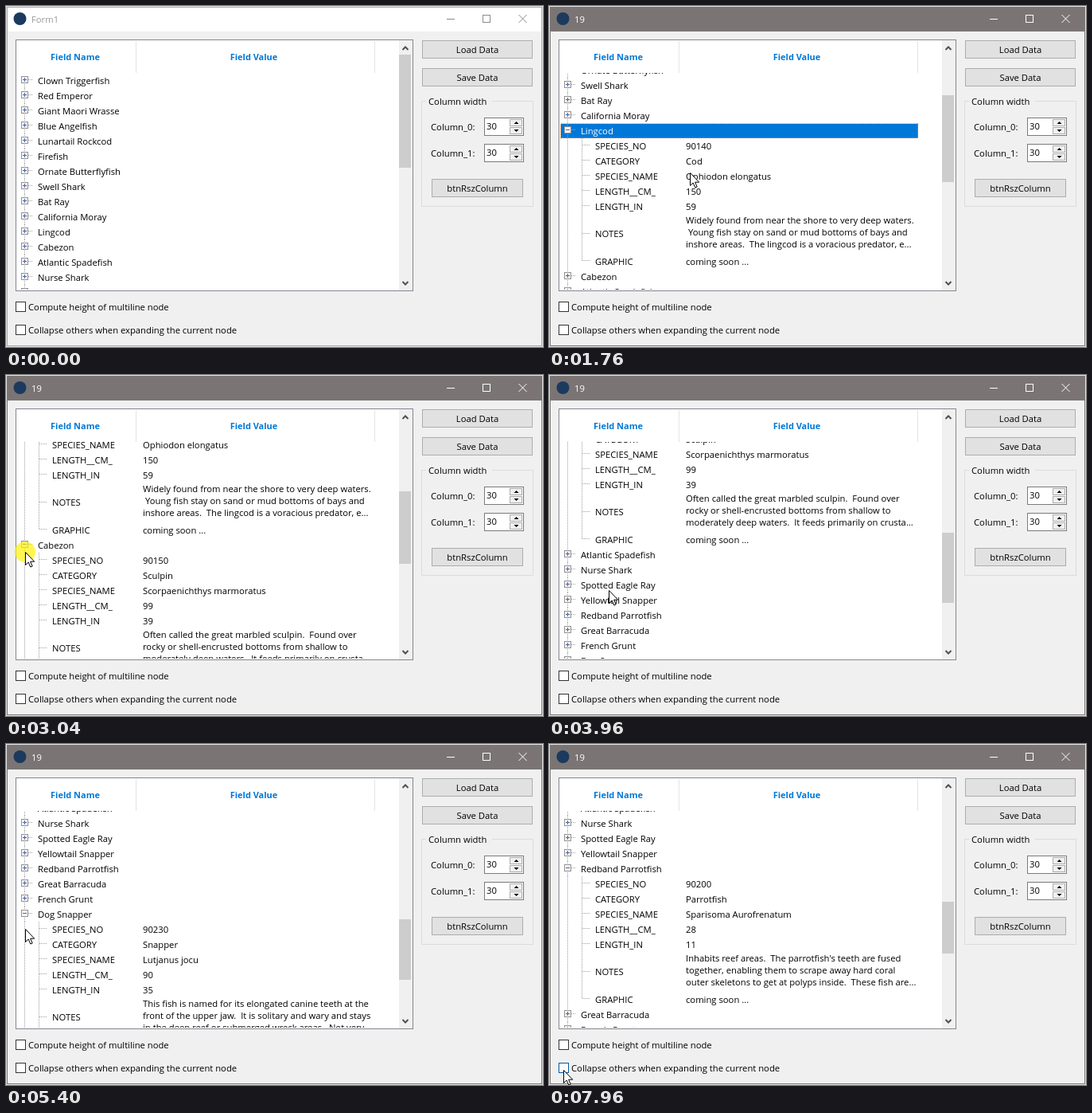
Write an HTML page that moves like this. It is 675 px wide and 428 px high and loops after 8 s.

```html
<!DOCTYPE html>
<html lang="en">
<head>
<meta charset="utf-8">
<title>Tree view</title>
<style>
  html, body { margin: 0; width: 100%; height: 100%; overflow: hidden; background: #e6e6e6; }
  svg { display: block; width: 675px; height: 428px; shape-rendering: crispEdges; }
  text { font: 11.25px "Open Sans", "Noto Sans", sans-serif; fill: #000; white-space: pre; }
  .head { font-weight: 700; font-size: 11px; fill: #0078d7; }
  .mid { text-anchor: middle; }
  .btn { fill: #e1e1e1; stroke: #adadad; }
  .check { fill: #fff; stroke: #333; }
  .check.hover { stroke: #005a9e; }
  .dots { stroke: #a0a0a0; stroke-dasharray: 1 1; fill: none; }
  .box { fill: #fafafa; stroke: #919191; }
  .sign { stroke: #4b63a7; fill: none; }
  .smooth { shape-rendering: geometricPrecision; }
  #frame { fill: #f0f0f0; stroke: #a6a6a6; }
  #bar { fill: #fff; }
  #caption { fill: #999; }
  #controls { stroke: #8c8c8c; fill: none; }
  .active #frame { stroke: #7a7574; }
  .active #bar { fill: #7a7574; }
  .active #caption { fill: #fff; }
  .active #controls { stroke: #fff; }
  .selection { display: none; fill: #0078d7; stroke: #e08a3c; stroke-dasharray: 1 1; }
  .selected .selection { display: inline; }
  .selected > .name { fill: #fff; }
  .details, .upright { display: none; }
  .open .details { display: inline; }
  .closed .upright { display: inline; }
</style>
</head>
<body>
<svg id="stage" viewBox="0 0 675 428">
  <defs>
    <clipPath id="view"><rect x="13" y="84" width="481" height="272"/></clipPath>
    <g id="spin">
      <rect x="1.5" y=".5" width="49" height="22" fill="#fff" stroke="#7a7a7a"/>
      <rect x="33.5" y="2.5" width="15" height="8" fill="#f0f0f0" stroke="#adadad"/>
      <rect x="33.5" y="12.5" width="15" height="8" fill="#f0f0f0" stroke="#adadad"/>
      <path class="smooth" d="M38.500 8h6l-3-3zM38.500 15h6l-3 3z"/>
      <text x="4" y="15">30</text>
    </g>
  </defs>

  <rect id="frame" x="1.5" y="1.5" width="672" height="425"/>
  <rect id="bar" x="2" y="2" width="671" height="30"/>
  <circle class="smooth" cx="17.500" cy="16" r="8" fill="#1c3a5e"/>
  <text id="caption" x="32" y="21"></text>
  <g id="controls">
    <path d="M554 16.5h10M599.500 11.500h9v9h-9z"/>
    <path class="smooth" d="M644.500 11l10 10M654.500 11l-10 10"/>
  </g>

  <rect x="12.5" y="42.500" width="499" height="315" fill="#fff" stroke="#828790"/>
  <path d="M163.500 44V84M463.500 44V84" stroke="#e5e5e5"/>
  <text class="head mid" x="87" y="68">Field Name</text>
  <text class="head mid" x="311.500" y="68">Field Value</text>
  <g id="tree" clip-path="url(#view)"></g>
  <rect x="494" y="43" width="17" height="314" fill="#f0f0f0"/>
  <path class="smooth" d="M498.500 55l3.500-3.500 3.500 3.500M498.500 346l3.500 3.500 3.500-3.500" fill="none" stroke="#505050" stroke-width="2"/>
  <rect id="thumb" x="494" width="15" fill="#cdcdcd"/>

  <rect class="btn" x="523.500" y="43.500" width="138" height="22"/>
  <text class="mid" x="592.500" y="59">Load Data</text>
  <rect class="btn" x="523.500" y="78.500" width="138" height="22"/>
  <text class="mid" x="592.500" y="94">Save Data</text>
  <path d="M528 119.500h-5.500v132h140v-132h-52" fill="none" stroke="#dcdcdc"/>
  <text x="531" y="124">Column width</text>
  <text x="534" y="156">Column_0:</text>
  <text x="534" y="189">Column_1:</text>
  <use href="#spin" x="600" y="140"/>
  <use href="#spin" x="600" y="173"/>
  <rect class="btn" x="535.500" y="217.500" width="114" height="22"/>
  <text class="mid" x="592.500" y="233">btnRszColumn</text>

  <rect id="check1" class="check" x="12.500" y="371.500" width="12" height="12"/>
  <text x="28" y="382">Compute height of multiline node</text>
  <rect id="check2" class="check" x="12.500" y="400.500" width="12" height="12"/>
  <text x="28" y="411">Collapse others when expanding the current node</text>

  <g id="cursor" class="smooth">
    <circle id="click" r="13" fill="#fff200" opacity=".68"/>
    <path d="M.5 .5V16.500L4.200 13 6.800 19 9.200 18 6.600 12.200H11.700Z" fill="#fff" stroke="#000"/>
  </g>
</svg>
<script>
const LOOP = 8000, TICK = 40, ROW = 19, NOTES = 50, DETAILS = ROW * 6 + NOTES;
const VIEW_TOP = 84, VIEW_HEIGHT = 273, TRACK_TOP = 61, TRACK = 278;

const names = `Clown Triggerfish,Red Emperor,Giant Maori Wrasse,Blue Angelfish,Lunartail Rockcod,Firefish,
Ornate Butterflyfish,Swell Shark,Bat Ray,California Moray,Lingcod,Cabezon,Atlantic Spadefish,Nurse Shark,
Spotted Eagle Ray,Yellowtail Snapper,Redband Parrotfish,Great Barracuda,French Grunt,Dog Snapper,
Nassau Grouper,Bluehead Wrasse,Yellow Jack,Redtail Surfperch,White Sea Bass,Rock Greenling,Senorita,Surf Smelt`
  .split(/,\s*/);
const fields = ['SPECIES_NO', 'CATEGORY', 'SPECIES_NAME', 'LENGTH__CM_', 'LENGTH_IN', 'NOTES', 'GRAPHIC'];

const records = {
  Lingcod: { opens: 400, values: ['90140', 'Cod', 'Ophiodon elongatus', '150', '59',
    ['Widely found from near the shore to very deep waters.',
     ' Young fish stay on sand or mud bottoms of bays and',
     'inshore areas.  The lingcod is a voracious predator, e...']] },
  Cabezon: { opens: 3040, values: ['90150', 'Sculpin', 'Scorpaenichthys marmoratus', '99', '39',
    ['Often called the great marbled sculpin.  Found over',
     'rocky or shell-encrusted bottoms from shallow to',
     'moderately deep waters.  It feeds primarily on crusta...']] },
  'Dog Snapper': { opens: 5040, values: ['90230', 'Snapper', 'Lutjanus jocu', '90', '35',
    ['This fish is named for its elongated canine teeth at the',
     'front of the upper jaw.  It is solitary and wary and stays',
     'in the deep reef or submerged wreck areas.  Not very ...']] },
  'Redband Parrotfish': { opens: 6600, values: ['90200', 'Parrotfish', 'Sparisoma Aurofrenatum', '28', '11',
    ["Inhabits reef areas.  The parrotfish's teeth are fused",
     'together, enabling them to scrape away hard coral',
     'outer skeletons to get at polyps inside.  These fish are...']] },
};

// time, scroll offset, content height known to the scroll bar
const scrolls = [
  [0, 0, 532], [400, 70, 665], [1760, 127, 696], [1800, 241, 696], [3040, 253, 829],
  [3600, 310, 860], [3680, 367, 860], [3760, 424, 860], [4080, 481, 860], [4160, 538, 860],
  [5040, 569, 993], [6600, 569, 1157],
];

// start, end, target x and y, optional control point of the curve
const moves = [
  [400, 1040, 225, 272], [1320, 1600, 177, 209], [2160, 2880, 24, 222, 90, 262],
  [3120, 3800, 78, 268], [3880, 3960, 75, 270], [4160, 4680, 31, 236], [4800, 4880, 26, 240],
  [5000, 5040, 23, 241], [5200, 5800, 26, 205], [5880, 6240, 26, 160], [6400, 6440, 27, 155],
  [6960, 7720, 18, 392, 140, 290], [7800, 7960, 18, 409],
];
const clicks = [3040, 5040, 6600];

const $ = id => document.getElementById(id);

function add(parent, tag, attrs, text) {
  const node = document.createElementNS('http://www.w3.org/2000/svg', tag);
  for (const key in attrs) node.setAttribute(key, attrs[key]);
  if (text) node.textContent = text;
  return parent.appendChild(node);
}

const label = (parent, x, y, text, cls = '') => add(parent, 'text', { x, y, class: cls }, text);

function addDetails(node, values) {
  const group = add(node, 'g', { class: 'details' });
  add(group, 'path', { class: 'dots', d: `M23.5 ${ROW}V${ROW + DETAILS}M41.5 ${ROW}V${ROW + DETAILS - 10}` });
  let y = ROW;
  [...values, 'coming soon ...'].forEach((value, i) => {
    const lines = Array.isArray(value);
    const height = lines ? NOTES : ROW;
    const middle = Math.floor(height / 2);
    add(group, 'path', { class: 'dots', d: `M42 ${y + middle - .5}H51` });
    label(group, 58, y + middle + (lines ? 4 : 5), fields[i]);
    if (lines) value.forEach((line, k) => label(group, 172, y + 12 + 15 * k, line));
    else label(group, 172, y + 14, value);
    y += height;
  });
}

const nodes = names.map((name, i) => {
  const node = add($('tree'), 'g', { class: 'closed' });
  const record = records[name];
  add(node, 'rect', { class: 'selection', x: 14.5, y: .5, width: 449, height: 18 });
  add(node, 'path', { class: 'dots', d: `M23.5 ${i ? 0 : 8}V${ROW}M28 8.5H33` });
  if (record) addDetails(node, record.values);
  add(node, 'rect', { class: 'box', x: 19.5, y: 4.5, width: 8, height: 8 });
  add(node, 'path', { class: 'sign', d: 'M21 8.5H26' });
  add(node, 'path', { class: 'sign upright', d: 'M23.5 6V11' });
  label(node, 40, 14, name, 'name');
  return { node, name, opens: record ? record.opens : Infinity };
});

function cursorAt(t) {
  let x = 75, y = 283;
  for (const [start, end, tx, ty, cx = (x + tx) / 2, cy = (y + ty) / 2] of moves) {
    if (t < start) break;
    const p = Math.min(1, (t - start) / (end - start));
    const k = p * p * (3 - 2 * p);
    const curve = (a, c, b) => (1 - k) ** 2 * a + 2 * k * (1 - k) * c + k * k * b;
    [x, y] = [curve(x, cx, tx), curve(y, cy, ty)];
  }
  return [Math.round(x), Math.round(y)];
}

function draw(t) {
  const active = t >= 400;
  $('stage').classList.toggle('active', active);
  $('caption').textContent = active ? '19' : 'Form1';

  const [, offset, total] = scrolls.filter(s => s[0] <= t).pop();
  let y = VIEW_TOP - offset;
  for (const { node, name, opens } of nodes) {
    const open = t >= opens;
    node.setAttribute('class', (open ? 'open' : 'closed') + (open && name === 'Lingcod' ? ' selected' : ''));
    node.setAttribute('transform', `translate(0 ${y})`);
    y += ROW + (open ? DETAILS : 0);
  }
  $('thumb').setAttribute('y', Math.round(TRACK_TOP + offset * TRACK / total));
  $('thumb').setAttribute('height', Math.floor(VIEW_HEIGHT * TRACK / total));

  $('cursor').setAttribute('visibility', active ? 'visible' : 'hidden');
  $('cursor').setAttribute('transform', `translate(${cursorAt(t)})`);
  $('click').style.display = clicks.some(c => t >= c && t < c + 80) ? '' : 'none';
  $('check1').classList.toggle('hover', t >= 7640 && t < 7800);
  $('check2').classList.toggle('hover', t >= 7880);
}

const origin = performance.now();
function play() {
  const t = (performance.now() - origin) % LOOP;
  draw(Math.floor(t / TICK) * TICK);
  requestAnimationFrame(play);
}
play();
</script>
</body>
</html>
```
